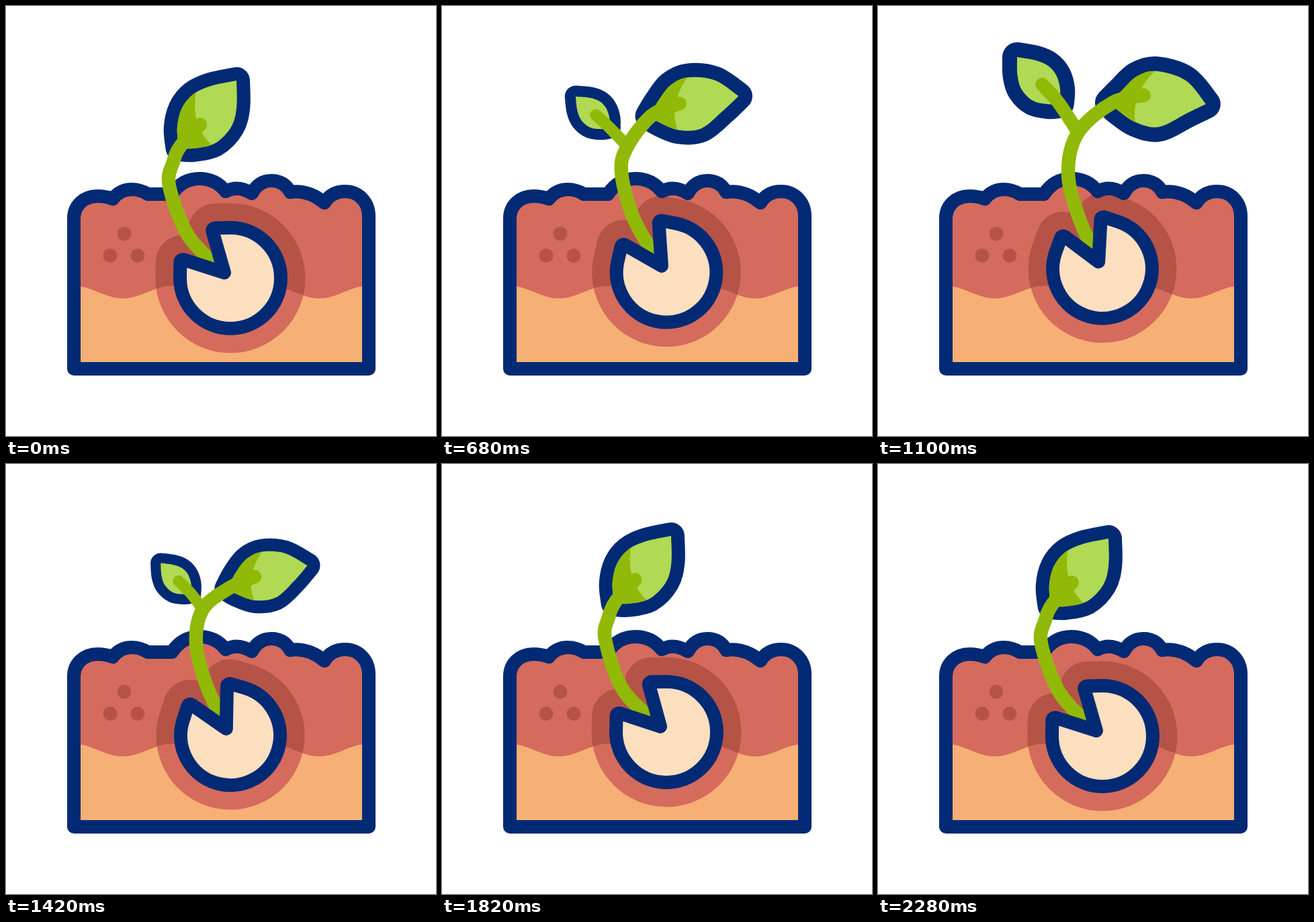
Write an HTML page with a canvas that moves like this. It is 640 by 640 pixels and loops after 2.72 s.

```html
<!DOCTYPE html>
<html lang="en">
<head>
<meta charset="utf-8">
<title>Sprouting seed</title>
<style>
html, body { margin: 0; width: 100%; height: 100%; overflow: hidden; background: #fff; }
canvas { display: block; width: 100vw; height: 100vh; }
</style>
</head>
<body>
<canvas id="stage" width="640" height="640"></canvas>
<script>
const ctx = document.getElementById('stage').getContext('2d');
const LOOP = 2720;
const BLUE = '#022a74', SOIL = '#d56b5d', SHADE = '#b55347', SAND = '#f6af74';
const CREAM = '#fcdfbf', STEM = '#91b908', LEAF = '#b0d954';

const lerp = (a, b, k) => a + (b - a) * k;
const mix = (p, q, k) => p.map((v, i) => lerp(v, q[i], k));

// Pose: seed dy, seed turn, leaf openness, stem low, stem mid, fork,
// big leaf base and tip, small leaf base and tip (from the fork)
const rest   = [0, 0, 0,      272, 343, 243, 268, 249, 232, 260, 208, 343, 111, 0, 0, 0, 0];
const crouch = [10, -2, 0,    274, 354, 247, 288, 252, 258, 258, 240, 331, 150, 0, 0, 0, 0];
const rise   = [-8.5, 12, .75, 286, 318, 267, 248, 276, 209, 312, 163, 441, 134, -28, -29, -77, -74];
const open   = [-14, 19, 1,   298, 312, 283, 247, 298, 188, 349, 144, 488, 146, -30, -45, -91, -112];
const sink   = [-1, 17, .6,   298, 328, 283, 268, 293, 216, 333, 184, 449, 151, -19, -25, -63, -69];
const spring = [-6, .5, 0,    270, 337, 243, 262, 248, 228, 259, 204, 341, 107, 0, 0, 0, 0];

const keys = [
  [220, rest],
  [380, crouch],
  [680, rise],
  [860, mix(rise, open, .92)],
  [1100, open],
  [1270, mix(rise, open, 1.07)],
  [1420, sink],
  [1570, mix(sink, crouch, .85)],
  [1820, spring],
  [1900, mix(rest, spring, 1.8)],
  [2280, rest]
];

// Monotone cubic interpolation between the keys
function slope(i, n) {
  if (i === 0 || i === keys.length - 1) return 0;
  const d = j => (keys[j + 1][1][n] - keys[j][1][n]) / (keys[j + 1][0] - keys[j][0]);
  const a = d(i - 1), b = d(i);
  return a * b <= 0 ? 0 : 2 * a * b / (a + b);
}

function poseAt(t) {
  if (t <= keys[0][0] || t >= keys[keys.length - 1][0]) return rest;
  let i = 0;
  while (t >= keys[i + 1][0]) i++;
  const [t0, p] = keys[i], [t1, q] = keys[i + 1];
  const h = t1 - t0, x = (t - t0) / h, y = 1 - x;
  return p.map((v, n) =>
    v * (1 + 2 * x) * y * y + q[n] * (3 - 2 * x) * x * x +
    h * x * y * (slope(i, n) * y - slope(i + 1, n) * x));
}

// Smooth curve through points, appended to a path
function curve(path, pts) {
  for (let i = 0; i < pts.length - 1; i++) {
    const a = pts[i - 1] || pts[i], b = pts[i], c = pts[i + 1], d = pts[i + 2] || c;
    path.bezierCurveTo(
      b[0] + (c[0] - a[0]) / 6, b[1] + (c[1] - a[1]) / 6,
      c[0] - (d[0] - b[0]) / 6, c[1] - (d[1] - b[1]) / 6, c[0], c[1]);
  }
}

function stroke(path, color, width) {
  ctx.strokeStyle = color;
  ctx.lineWidth = width;
  ctx.stroke(path);
}

function fill(path, color) {
  ctx.fillStyle = color;
  ctx.fill(path);
}

function line(pts, width) {
  const path = new Path2D();
  path.moveTo(...pts[0]);
  curve(path, pts);
  stroke(path, STEM, width);
}

const ground = new Path2D(
  'M101 540V316C101 297 116 283 136 283Q148 283 159 287Q170 273 187 273Q200 273 211 280' +
  'H247Q262 257 288 257Q312 257 327 276Q345 266 366 279Q376 260 395 260Q414 260 423 277' +
  'Q450 273 474 293Q484 276 505 276C525 276 540 292 540 313V540Z');

const sand = new Path2D();
sand.moveTo(101, 540);
for (let x = 101; x <= 540; x += 3) {
  sand.lineTo(x, 426 - 9.3 * Math.cos((x - 101) / 146 * Math.PI * 2));
}
sand.lineTo(540, 540);
sand.closePath();

const notch = [-9, -8];
const seed = new Path2D();
seed.moveTo(...notch);
seed.arcTo(-28, -74.5, 0, -75, 4);
seed.lineTo(0, -75);
seed.arc(0, 0, 75, -Math.PI / 2, Math.PI);
seed.arcTo(-74.5, -29, ...notch, 4);
seed.closePath();

// Leaf outlines along a base-to-tip axis of length 1
const shut = {
  top: [[.13, -.165], [.34, -.273], [.55, -.28], [.76, -.185]],
  low: [[.07, .13], [.28, .285], [.55, .304], [.77, .2]],
  edge: [[.62, -.29], [.25, -.075], [.24, .28]]
};
const wide = {
  top: [[.1, -.135], [.26, -.288], [.47, -.345], [.78, -.25]],
  low: [[.06, .08], [.25, .205], [.5, .252], [.8, .1]],
  edge: [[.47, -.37], [.165, -.07], [.26, .27]]
};

function drawLeaf(base, tip, k, flip, rim, shaded) {
  const ax = tip[0] - base[0], ay = tip[1] - base[1];
  const len = Math.hypot(ax, ay);
  if (len < 2) return;
  const at = ([u, v]) => [base[0] + ax * u - ay * v * flip, base[1] + ay * u + ax * v * flip];
  const part = name => shut[name].map((p, i) => at(mix(p, wide[name][i], k)));
  const root = at([-.03, 0]);
  const path = new Path2D();
  path.moveTo(...root);
  curve(path, [root, ...part('top'), tip]);
  curve(path, [tip, ...part('low').reverse(), root]);
  path.closePath();
  stroke(path, BLUE, len * rim * 2);
  fill(path, LEAF);
  if (!shaded) return;
  const [a, c, b] = part('edge');
  const dark = new Path2D();
  dark.moveTo(...a);
  dark.quadraticCurveTo(...c, ...b);
  dark.lineTo(...at([-.5, .5]));
  dark.lineTo(...at([-.5, -.5]));
  ctx.save();
  ctx.clip(path);
  fill(dark, STEM);
  ctx.restore();
}

function draw(t) {
  const [dy, turn, k, lx, ly, mx, my, fx, fy, bx, by, tx, ty, sx, sy, ux, uy] = poseAt(t);
  const cx = 334, cy = 405 + dy, rot = turn * Math.PI / 180, size = 1 - turn * .0008;
  const frame = new DOMMatrix([1, 0, 0, 1, cx, cy]).rotate(turn).scale(size);
  const body = new Path2D();
  body.addPath(seed, frame);

  ctx.fillStyle = '#fff';
  ctx.fillRect(0, 0, 640, 640);
  ctx.lineJoin = ctx.lineCap = 'round';

  fill(ground, SOIL);
  fill(sand, SAND);
  for (const [x, y] of [[176, 339], [155, 371.5], [196, 371.5]]) {
    const dot = new Path2D();
    dot.arc(x, y, 10.5, 0, Math.PI * 2);
    fill(dot, SHADE);
  }

  stroke(body, SHADE, 73);
  ctx.save();
  ctx.clip(sand);
  fill(sand, SAND);
  stroke(body, SOIL, 73);
  ctx.restore();
  stroke(ground, BLUE, 20);

  const base = [bx, by], tip = [tx, ty], fork = [fx, fy];
  const base2 = [fx + sx, fy + sy], tip2 = [fx + ux, fy + uy];
  const size2 = Math.hypot(ux - sx, uy - sy);
  drawLeaf(base, tip, k, 1, .157, true);
  drawLeaf(base2, tip2, 0, -1, .243, false);

  if (size2 > 2) line([fork, base2, mix(base2, tip2, .39)], lerp(10, 20, size2 / 90));
  const u = .335, v = lerp(.01, -.086, k);
  const end = [bx + (tx - bx) * u - (ty - by) * v, by + (ty - by) * u + (tx - bx) * v];
  const c = Math.cos(rot), s = Math.sin(rot);
  const foot = [cx + notch[0] * c - notch[1] * s, cy + notch[0] * s + notch[1] * c];
  line([foot, [lx, ly], [mx, my], fork, base, end], 20.5);

  fill(body, CREAM);
  stroke(body, BLUE, 20);
}

const start = performance.now();
function tick(now) {
  draw(Math.max(0, now - start) % LOOP);
  requestAnimationFrame(tick);
}
draw(0);
requestAnimationFrame(tick);
</script>
</body>
</html>
```
